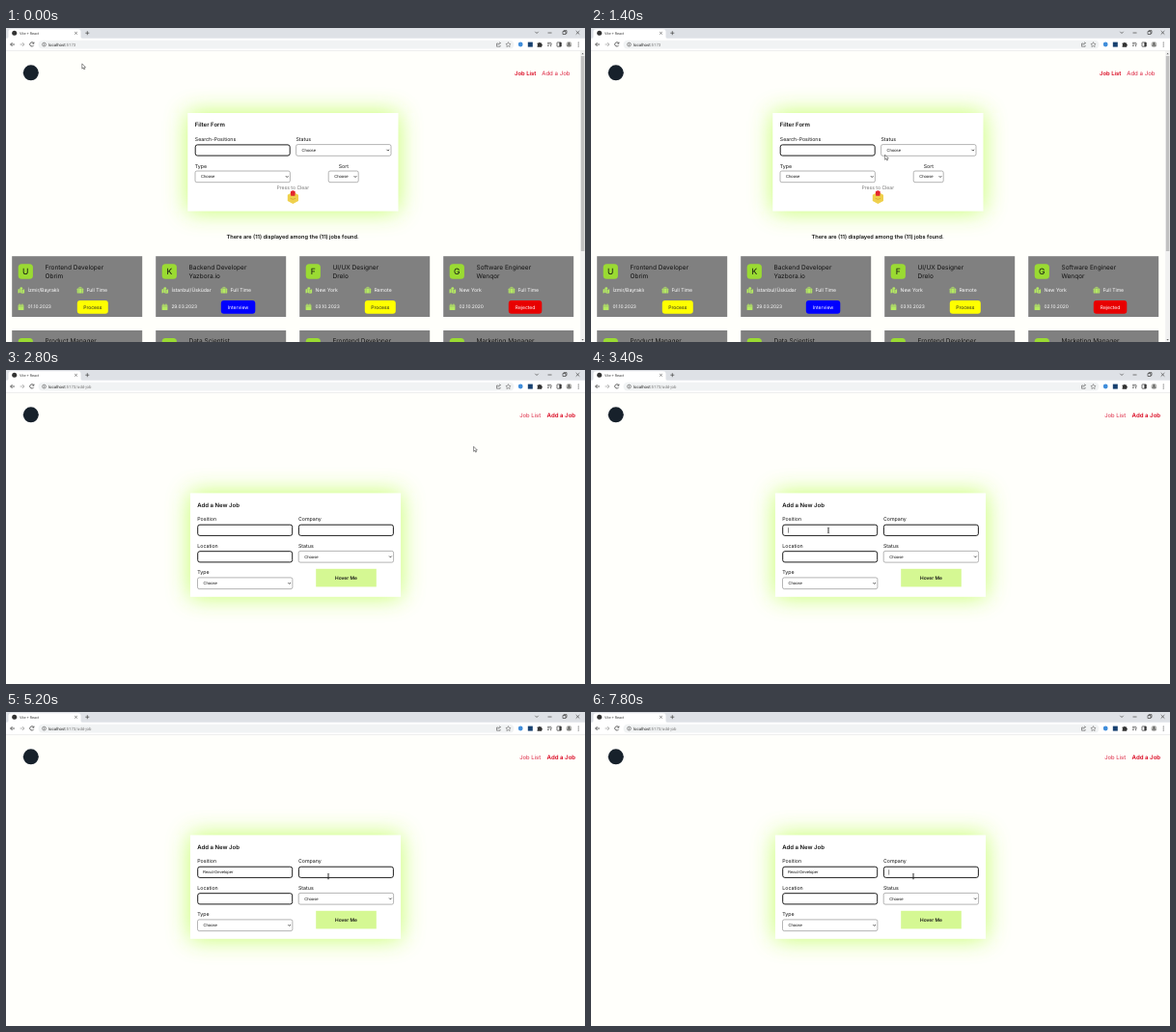
These frames come from a looping animation (600x325 px, 8 s). An HTML page:

```html
<!DOCTYPE html>
<html lang="en">
<head>
<meta charset="utf-8">
<title>Job board</title>
<style>
  html, body { margin: 0; width: 100%; height: 100%; overflow: hidden; background: #fffffb; }
  svg { display: block; width: 100%; height: 100%; }
  text { font-family: Inter, "Open Sans", sans-serif; text-rendering: geometricPrecision; white-space: pre; }
  .ui { font-family: "Liberation Sans", Arial, sans-serif; }
  .chrome { font-family: Roboto, "Open Sans", sans-serif; }
</style>
</head>
<body>
<svg id="stage" viewBox="0 0 600 325" xmlns="http://www.w3.org/2000/svg"></svg>
<script>
const LOOP = 8000, STEP = 200;
const ADD_PAGE_AT = 2700;

const rect = (x, y, w, h, fill, r = 0, extra = '') =>
  `<rect x="${x}" y="${y}" width="${w}" height="${h}" rx="${r}" fill="${fill}" ${extra}/>`;
const circle = (x, y, r, fill, extra = '') =>
  `<circle cx="${x}" cy="${y}" r="${r}" fill="${fill}" ${extra}/>`;
const path = (d, fill, extra = '') => `<path d="${d}" fill="${fill}" ${extra}/>`;
const line = (d, color = '#444', width = .7) => path(d, 'none', `stroke="${color}" stroke-width="${width}"`);
const text = (x, y, size, str, { fill = '#111', weight = 400, anchor = 'start', cls = '', id = '' } = {}) =>
  `<text x="${x}" y="${y}" font-size="${size}" fill="${fill}" font-weight="${weight}" text-anchor="${anchor}" class="${cls}" id="${id}">${str}</text>`;
const group = (id, body) => `<g id="${id}">${body}</g>`;

/* Browser window */
function browser() {
  return rect(0, 0, 600, 11, '#dee1e6') +
    path('M1 11 Q2.5 11 2.5 9 V3.5 Q2.5 1.2 5 1.2 H75 Q77.5 1.2 77.5 3.5 V9 Q77.5 11 79 11 Z', '#fff') +
    circle(8.7, 5.3, 2.5, '#333') +
    text(14, 6.8, 3.8, 'Vite + React', { cls: 'chrome', fill: '#444' }) +
    line('M71.2 4 l2.6 2.6 m0 -2.6 l-2.6 2.6', '#444', .6) +
    line('M82.3 5.2 h4 m-2 -2 v4') +
    line('M548.3 3.8 l1.7 1.7 l1.7 -1.7') +
    line('M561.5 5 h4') +
    line('M577 3.5 h3 v3 h-3 z M578 3.5 v-.9 h3 v3 h-1') +
    line('M590.7 3 l3.6 3.6 m0 -3.6 l-3.6 3.6') +
    rect(0, 10.7, 600, 13, '#fff') +
    line('M9 17 h-4.4 m2 -2 l-2 2 l2 2', '#444', .8) +
    line('M14.6 17 h4.4 m-2 -2 l2 2 l-2 2', '#aaa', .8) +
    line('M28.6 15.8 a2.1 2.1 0 1 0 .1 2 M28.9 14.5 v1.6 h-1.6', '#444', .8) +
    rect(33.5, 12.8, 493, 8.6, '#f1f3f4', 4.3) +
    circle(39.5, 17.1, 1.9, 'none', 'stroke="#555" stroke-width=".6"') +
    line('M39.5 16.8 v1.3 m0 -2.3 v.5', '#555', .6) +
    `<text x="44" y="18.7" font-size="4.3" class="chrome" fill="#222">localhost<tspan fill="#777">:5173<tspan id="route"></tspan></tspan></text>` +
    line('M510 16 h-1.5 v3.2 h3.6 v-1.3 M509.8 17.8 q.3 -2.2 2.6 -2.2 m-1 -1 l1.1 1 l-1.1 1', '#555', .6) +
    line('M520.5 14.6 l.8 1.7 l1.8 .2 l-1.3 1.2 l.3 1.8 l-1.6 -.9 l-1.6 .9 l.3 -1.8 l-1.3 -1.2 l1.8 -.2 z', '#555', .5) +
    circle(533.2, 17, 2.4, '#3f8ddb') +
    rect(540.8, 14.6, 5, 5, '#17406f') +
    path('M550.6 15.5 h1.5 a.8 .8 0 0 1 1.6 0 h1.5 v1.4 a.8 .8 0 0 1 0 1.6 v1.3 h-4.6 v-1.5 a.8 .8 0 0 0 0 -1.4 z', '#333') +
    line('M561 15.3 h4.2 m-4.2 1.6 h2.6 m-2.6 1.6 h1.6 m2 .8 v-2.6 h1.2', '#444', .7) +
    rect(571, 14.9, 4.4, 4.3, 'none', .4, 'stroke="#333" stroke-width=".7"') + rect(573.4, 15, 1.8, 4, '#333') +
    circle(583.4, 17, 2.9, '#b9b9b6') + path('M581 18.6 a2.6 2.2 0 0 1 4.8 0 z', '#555') + circle(583.4, 16, 1, '#555') +
    [15, 17, 19].map(y => circle(593.2, y, .55, '#333')).join('') +
    rect(0, 23.3, 600, .5, '#dcdcdc');
}

/* Form parts */
const label = (x, y, str, anchor) => text(x, y, 5.25, str, { anchor });
const input = (x, y) => rect(x, y, 98, 11.2, '#fff', 2.2, 'stroke="#111" stroke-width=".95"');
const select = (x, y, w = 98.4, pad = 6) =>
  rect(x, y, w, 11.7, '#fff', 1.8, 'stroke="#777" stroke-width=".55"') +
  text(x + pad, y + 7.3, 4.2, 'Choose', { cls: 'ui' }) +
  line(`M${x + w - 4.5} ${y + 5.2} l1.3 1.3 l1.3 -1.3`, '#111', .75);
const panel = (x, y, w, h) =>
  rect(x, y, w, h, '#adff2f', 0, 'filter="url(#glow)" opacity=".72"') + rect(x, y, w, h, '#fff');

function nav(x, addX, listActive) {
  const style = on => ({ fill: on ? '#d9001b' : '#dc2340', weight: on ? 600 : 400 });
  return text(x, 48.8, 5.9, 'Job List', style(listActive)) +
    text(addX, 48.8, 6.1, 'Add a Job', style(!listActive));
}

/* Job cards */
const YELLOW = ['#ffff00', '#222'], BLUE = ['#0000ff', '#fff'], RED = ['#e80000', '#fff'];
const jobs = [
  ['U', 'Frontend Developer', 'Obrim', 'İzmir/Bayraklı', 'Full Time', '01.10.2023', 'Process', 32, YELLOW],
  ['K', 'Backend Developer', 'Yazbora.io', 'İstanbul/Üsküdar', 'Full Time', '29.03.2023', 'Interview', 35.5, BLUE],
  ['F', 'UI/UX Designer', 'Drelo', 'New York', 'Remote', '03.10.2023', 'Process', 32, YELLOW],
  ['G', 'Software Engineer', 'Wenqor', 'New York', 'Full Time', '02.10.2020', 'Rejected', 34.5, RED],
];
const nextTitles = ['Product Manager', 'Data Scientist', 'Frontend Developer', 'Marketing Manager'];
const cardX = i => 6.2 + 149 * i;
const icons = (x, color = '#b5ea62') =>
  path(`M${x + 6.3} 270.6 l2 -.7 v4 l-2 .7 z m2.4 -.3 l1.8 .8 v3.8 l-1.8 -.9 z m2.3 .8 l1.9 -.8 v3.9 l-1.9 .8 z`, color) +
  circle(x + 9.6, 269.6, 1.4, color) +
  rect(x + 67.5, 269.6, 6.5, 5, color, .7) +
  line(`M${x + 69.6} 269.6 v-1.2 h2.3 v1.2`, color, .7) +
  line(`M${x + 69} 269.6 v5 m3.5 -5 v5`, '#808080', .4) +
  rect(x + 6.4, 286.4, 5.8, 5.6, color, .6) +
  line(`M${x + 7.9} 285.4 v1.5 m2.8 -1.5 v1.5`, color, .8) +
  line(`M${x + 6.4} 288 h5.8`, '#808080', .4);

function cardHead(x, y, title) {
  return rect(x, y, 135, 62.8, '#808080') +
    rect(x + 6.5, y + 8, 15.2, 15.6, '#9adb32', 3.6) +
    text(x + 34.3, y + 13.3, 6.5, title);
}
function card([initial, title, company, place, type, date, status, width, [bg, fg]], i) {
  const x = cardX(i), white = { fill: '#fff' };
  return cardHead(x, 236.2, title) +
    text(x + 14.1, 255.3, 8.6, initial, { anchor: 'middle' }) +
    text(x + 34.3, 259.2, 6.5, company) +
    icons(x) +
    text(x + 16.4, 273.3, 5.1, place, white) +
    text(x + 77.2, 273.3, 5.1, type, white) +
    text(x + 16.2, 290.4, 4.9, date, white) +
    rect(x + 67.6, 282, width, 13.8, bg, 3) +
    text(x + 67.6 + width / 2, 290.6, 5, status, { fill: fg, anchor: 'middle' });
}

function listPage() {
  return nav(527, 555.2, true) +
    panel(188.3, 88, 218.2, 101.6) +
    text(195.8, 102.4, 6, 'Filter Form', { weight: 600 }) +
    label(195.8, 117, 'Search-Positions') + input(196.2, 120.9) +
    label(300.4, 117, 'Status') + select(300.6, 120.6) +
    label(195.8, 144.6, 'Type') + select(196, 148) +
    label(349.8, 144.6, 'Sort', 'middle') + select(334.2, 148, 31) +
    text(297.3, 167.4, 5.1, 'Press to Clear', { anchor: 'middle', fill: '#777' }) +
    path('M297.4 169.5 l5.6 3.2 v6.2 l-5.6 3.2 l-5.6 -3.2 v-6.2 z', '#efd04c') +
    path('M294.8 169.4 q2.5 -2.2 5 0 l-.4 4.4 h-4.2 z', '#e3262e') +
    line('M294.6 176.3 q2.8 2 5.6 0', '#c99b25', .6) +
    text(297.2, 218.2, 5.65, 'There are (11) displayed among the (11) jobs found.', { anchor: 'middle', weight: 600 }) +
    jobs.map(card).join('') +
    nextTitles.map((title, i) => cardHead(cardX(i), 313, title)).join('') +
    rect(595.2, 23.8, 4.8, 301.2, '#f1f1f1') +
    rect(595.8, 29, 3.6, 202, '#c1c1c1') +
    path('M597.6 25.8 l1.2 1.5 h-2.4 z M597.6 323.4 l1.2 -1.5 h-2.4 z', '#666');
}

function addPage() {
  return nav(532.2, 560.6, false) +
    panel(190.9, 127.4, 218.2, 107.4) +
    text(198.3, 142, 6, 'Add a New Job', { weight: 600 }) +
    label(198.3, 156.4, 'Position') + input(198.7, 160.2) +
    label(303, 156.4, 'Company') + input(303.4, 160.2) +
    label(198.3, 183.9, 'Location') + input(198.7, 187.7) +
    label(303, 183.9, 'Status') + select(303.2, 187.4) +
    label(198.3, 211.3, 'Type') + select(198.5, 214.9) +
    rect(321.2, 205.8, 62.6, 18.6, '#d5f893') +
    text(352.4, 216.7, 4.9, 'Hover Me', { anchor: 'middle', weight: 600 }) +
    text(204, 167.3, 4.2, '', { cls: 'ui', id: 'typed' }) +
    rect(0, 163.2, .5, 5.4, '#111', 0, 'id="caret"');
}

const outline = 'stroke="#222" stroke-width=".5" stroke-linejoin="round"';
const pointers = {
  arrow: path('M0 0 v5.1 l1.2 -1.1 l.8 1.9 l.9 -.4 l-.8 -1.8 h1.6 z', '#fff', outline),
  hand: path('M0 .5 q.6 -.9 1.1 0 v2.2 l2.7 .7 q.6 .3 .4 1.2 l-.6 2.4 h-2.9 l-2 -2.6 q.1 -.8 .8 -.4 l.5 .5 z', '#fff', outline),
  beam: line('M-1.1 -2.8 q1.1 0 1.1 .7 v4.2 q0 .7 1.1 .7 M1.1 -2.8 q-1.1 0 -1.1 .7 v4.2 q0 .7 -1.1 .7', '#222', .55),
};

document.getElementById('stage').innerHTML =
  '<defs><filter id="glow" x="-30%" y="-50%" width="160%" height="200%"><feGaussianBlur stdDeviation="12"/></filter></defs>' +
  rect(0, 0, 600, 325, '#fffffb') +
  group('list', listPage()) + group('add', addPage()) +
  circle(25.8, 46.3, 8, '#17212b') + browser() +
  group('pointer', Object.entries(pointers).map(([name, body]) => group(name, body)).join(''));

/* Timeline: time, x, y */
const track = [
  [0, 78.8, 37], [200, 82, 39], [1200, 296, 126], [1400, 304.6, 131.2], [1600, 314, 128],
  [2400, 566, 51], [2600, 567.6, 49], [2800, 484.6, 79.2], [3400, 246, 166],
  [3800, 250, 168], [4200, 313.8, 171], [4600, 334, 170.2], [LOOP, 334, 170.2],
];
const VALUE = 'React-Developer', TYPE_START = 3600, TYPE_END = 4200, COMPANY_FOCUS = 5800, BLINK = 530;
const $ = id => document.getElementById(id);
const show = (id, on) => $(id).setAttribute('visibility', on ? 'visible' : 'hidden');

function pointerAt(t) {
  const i = Math.max(1, track.findIndex(k => k[0] >= t));
  const [t0, x0, y0] = track[i - 1], [t1, x1, y1] = track[i];
  const p = (t - t0) / (t1 - t0), e = p * p * (3 - 2 * p);
  return [x0 + (x1 - x0) * e, y0 + (y1 - y0) * e];
}

function caretOn(t) {
  if (t < 3400) return false;
  if (t <= TYPE_END) return true;
  const phase = t < COMPANY_FOCUS ? t - TYPE_END : t - COMPANY_FOCUS + 200;
  return Math.floor(phase / BLINK) % 2 === 0;
}

function render(t) {
  const adding = t >= ADD_PAGE_AT;
  $('list').style.display = adding ? 'none' : '';
  $('add').style.display = adding ? '' : 'none';
  $('route').textContent = adding ? '/add-job' : '';

  const p = Math.min(1, Math.max(0, (t - TYPE_START) / (TYPE_END - TYPE_START)));
  $('typed').textContent = VALUE.slice(0, Math.round(p * VALUE.length));
  const typedWidth = adding && p > 0 ? $('typed').getComputedTextLength() : 0;
  $('caret').setAttribute('x', t < COMPANY_FOCUS ? 204 + typedWidth : 308.6);
  $('caret').style.display = caretOn(t) ? '' : 'none';

  const kind = t >= 3400 ? 'beam' : t >= 2400 && !adding ? 'hand' : 'arrow';
  for (const name in pointers) show(name, name === kind);
  $('pointer').setAttribute('transform', `translate(${pointerAt(t).join(' ')})`);
}

const start = performance.now();
function tick() {
  const t = (performance.now() - start) % LOOP;
  render(Math.floor(t / STEP) * STEP);
  requestAnimationFrame(tick);
}
tick();
</script>
</body>
</html>
```
